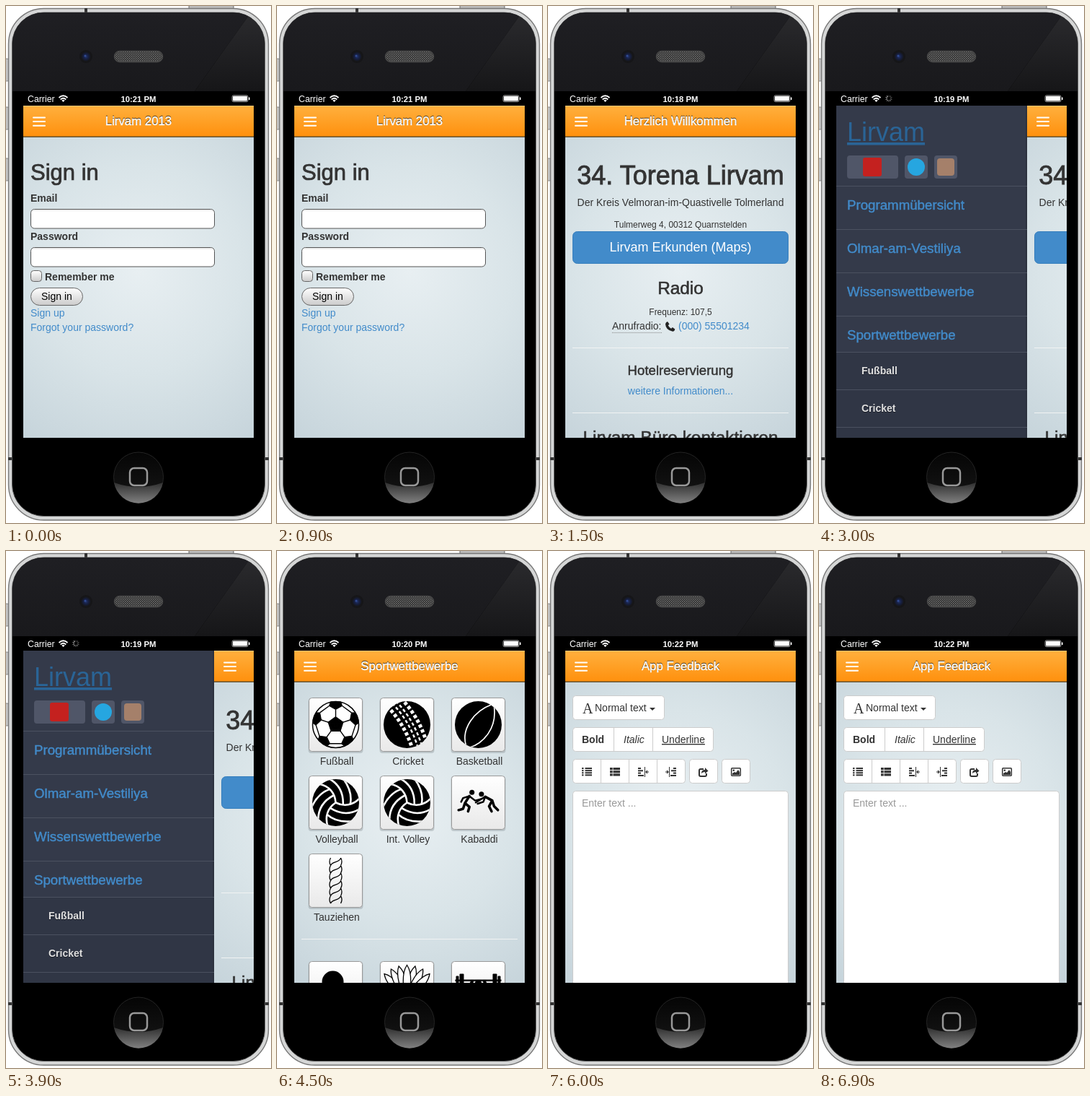
An HTML page for the animation above (7.5 s loop, 368 px wide and 716 px high).

```html
<!DOCTYPE html>
<html lang="de">
<head>
<meta charset="utf-8">
<title>Phone app tour</title>
<style>
html, body { margin: 0; width: 100%; height: 100%; overflow: hidden; background: #fff; }
svg { display: block; width: 368px; height: 716px; font-family: "Liberation Sans", Arial, sans-serif; }
text { white-space: pre; }
</style>
</head>
<body>
<svg id="stage" viewBox="0 0 368 716" xmlns="http://www.w3.org/2000/svg"></svg>
<script>
const SCENE_MS = 1500;
const LINK = '#428bca', INK = '#333';

// Markup helpers
const rect = (x, y, w, h, fill, r = 0, extra = '') =>
  `<rect x="${x}" y="${y}" width="${w}" height="${h}" rx="${r}" fill="${fill}" ${extra}/>`;
const circle = (x, y, r, fill, extra = '') => `<circle cx="${x}" cy="${y}" r="${r}" fill="${fill}" ${extra}/>`;
const path = (d, stroke, width = 1, fill = 'none', extra = '') =>
  `<path d="${d}" stroke="${stroke}" stroke-width="${width}" fill="${fill}" ${extra}/>`;
const group = (body, attrs = '') => `<g ${attrs}>${body}</g>`;
const at = (x, y, body) => group(body, `transform="translate(${x} ${y})"`);
const turn = (deg, body) => group(body, `transform="rotate(${deg})"`);
const text = (x, y, size, str, fill = INK, extra = '') =>
  `<text x="${x}" y="${y}" font-size="${size}" fill="${fill}" ${extra}>${str}</text>`;
const MID = 'text-anchor="middle"', BOLD = 'font-weight="bold"';
const medium = (x, y, size, str, fill = INK, extra = '') =>
  text(x, y, size, str, fill, `stroke="${fill}" stroke-width="${size / 42}" ${extra}`);
const centered = (y, size, str, fill) => text(184, y, size, str, fill, MID);
const heading = (y, size, str) => medium(184, y, size, str, INK, MID);
const repeat = (n, fn) => Array.from({ length: n }, (_, i) => fn(i)).join('');
const spokes = (n, fn) => repeat(n, i => turn(i * 360 / n, fn(i)));
const gradient = (id, top, bottom) =>
  `<linearGradient id="${id}" x2="0" y2="1"><stop stop-color="${top}"/><stop offset="1" stop-color="${bottom}"/></linearGradient>`;

const defs = `<defs>
  ${gradient('orange', '#ffb03e', '#ff900d')}
  ${gradient('button', '#fff', '#cbcbcb')}
  ${gradient('tile', '#fff', '#e9e9e9')}
  ${gradient('glass', '#1f1f23', '#19191c')}
  ${gradient('glare', '#2b2b2e', '#161618')}
  ${gradient('home', '#050505', '#171717')}
  ${gradient('homeShine', '#303030', '#808080')}
  <radialGradient id="paper" gradientUnits="userSpaceOnUse" cx="184" cy="365" r="290">
    <stop stop-color="#e8eff2"/><stop offset=".5" stop-color="#d9e4e8"/><stop offset="1" stop-color="#c5d3da"/>
  </radialGradient>
  <radialGradient id="lens"><stop stop-color="#22356f"/><stop offset=".5" stop-color="#172043"/><stop offset="1" stop-color="#15161c"/></radialGradient>
  <pattern id="mesh" width="3" height="3" patternUnits="userSpaceOnUse">
    ${rect(0, 0, 3, 3, '#242424')}${rect(0, 0, 1.5, 1.5, '#777')}${rect(1.5, 1.5, 1.5, 1.5, '#666')}
  </pattern>
  <clipPath id="screen">${rect(24, 118, 320, 480, '#000')}</clipPath>
  <clipPath id="ball">${circle(0, 0, 32.5, '#000')}</clipPath>
  <clipPath id="body">${rect(9, 9, 350, 698, '#000', 43)}</clipPath>
</defs>`;

function phone() {
  const sideButtons = [[73, 31], [140, 31], [211, 31]]
    .map(([y, h]) => rect(-3, y, 7, h, '#c4c4c4', 2, 'stroke="#888"')).join('');
  const bands = rect(109, 3, 4, 7, '#333') + rect(3, 625, 7, 4, '#333') + rect(358, 625, 7, 4, '#333');
  return sideButtons + rect(254, -2, 62, 7, '#bbb', 2, 'stroke="#666"')
    + rect(3.5, 3.5, 361, 708.5, '#d5d6d6', 49, 'stroke="#777" stroke-width="1.4"')
    + bands + rect(8.5, 9, 351, 697.5, '#000', 44, 'stroke="#555"')
    + group(path('M9 9H340L262 118H9Z', 'none', 0, 'url(#glass)')
      + path('M340 9H360V118H262Z', 'none', 0, 'url(#glare)'), 'clip-path="url(#body)"')
    + circle(111, 70, 9, '#161618') + circle(111, 70, 6.5, 'url(#lens)') + circle(110, 69, 1.5, '#324c94')
    + rect(150.5, 62.5, 67, 15, 'url(#mesh)', 7.5, 'stroke="#484848" stroke-width="1.5"')
    + circle(184, 652.5, 34.5, 'url(#home)', 'stroke="#242424"')
    + path('M150 660Q184 672 218 660A34.5 34.5 0 0 1 150 660Z', 'none', 0, 'url(#homeShine)')
    + rect(172, 640, 24, 24, 'none', 6, 'stroke="#999" stroke-width="2.5"');
}

function statusBar(time, busy) {
  const wifi = path('M73.5 127Q79.5 121.5 85.5 127M75.7 129.5Q79.5 126 83.3 129.5', '#fff', 1.7)
    + path('M79.5 133L77.3 130.7Q79.5 129 81.7 130.7Z', 'none', 0, '#fff');
  const spinner = busy ? at(97, 128, spokes(10, i =>
    path('M0 -2.3V-4.6', '#fff', 1, 'none', `opacity="${.25 + i * .06}"`))) : '';
  const battery = rect(314, 123.8, 22, 8.8, 'none', 2, 'stroke="#fff" stroke-width=".6"')
    + rect(315, 124.8, 20, 6.8, '#fff', 1) + rect(337, 126.5, 1.5, 3.5, '#fff');
  return rect(24, 118, 320, 20, '#000') + text(30, 132.5, 12.3, 'Carrier', '#fff') + wifi + spinner
    + text(184, 132.5, 11.3, time, '#fff', `${BOLD} ${MID}`) + battery;
}

function page(title, body) {
  return rect(24, 138, 320, 460, 'url(#paper)') + body
    + rect(24, 138, 320, 43, 'url(#orange)') + rect(24, 138, 320, 1, '#ffc674') + rect(24, 180.5, 320, 1.3, '#51401f')
    + repeat(3, i => rect(37, 153.5 + i * 5.6, 18, 2, '#fff', 1))
    + medium(184, 164, 16.8, title, '#4a351a', MID) + medium(184, 165, 16.8, title, '#fff', MID);
}
const divider = y => rect(34, y, 300, 1, '#f1f3f3');

function signIn() {
  const field = y => rect(34.5, y + .5, 255, 26.5, '#fff', 5, 'stroke="#555"') + rect(37, y + 1.5, 250, 1, '#ddd');
  return page('Lirvam 2013', medium(34, 241, 31, 'Sign in')
    + text(34, 271, 14, 'Email', INK, BOLD) + field(281)
    + text(34, 324, 14, 'Password', INK, BOLD) + field(334)
    + rect(34.5, 366.5, 15, 15, 'url(#button)', 4, 'stroke="#666"')
    + text(54, 380, 14, 'Remember me', INK, BOLD)
    + rect(34.5, 390.5, 72, 24, 'url(#button)', 12, 'stroke="#666"')
    + text(49, 407, 14, 'Sign in', '#000')
    + text(34, 430, 14, 'Sign up', LINK) + text(34, 450, 14, 'Forgot your password?', LINK));
}

function welcome() {
  const handset = path('M166 437l2.5 3.6-1.7 1.7q1.5 3 4.3 4.4l1.8-1.7 3.4 2.4q-.3 3-3.2 3.3Q163.5 449 163 440.5 163.5 437.5 166 437Z', 'none', 0, '#222');
  return page('Herzlich Willkommen', heading(247, 36, '34. Torena Lirvam')
    + centered(277, 14, 'Der Kreis Velmoran-im-Quastivelle Tolmerland')
    + centered(307, 12, 'Tulmerweg 4, 00312 Quarnstelden')
    + rect(34.5, 312.5, 299, 44, LINK, 6, 'stroke="#357ebd"')
    + centered(340, 18, 'Lirvam Erkunden (Maps)', '#fff')
    + heading(399, 24.4, 'Radio') + centered(428, 12, 'Frequenz: 107,5')
    + text(89, 448, 14, 'Anrufradio:') + path('M89 452.5H159', '#888', 1, 'none', 'stroke-dasharray="1 1"')
    + handset + text(181, 448, 14, '(000) 55501234', LINK)
    + divider(473) + heading(511, 18.6, 'Hotelreservierung')
    + centered(538, 14, 'weitere Informationen...', LINK)
    + divider(563) + heading(606, 24.4, 'Lirvam Büro kontaktieren'));
}

function menu() {
  const items = ['Programmübersicht', 'Olmar-am-Vestiliya', 'Wissenswettbewerbe', 'Sportwettbewerbe'];
  const line = y => rect(24, y, 265, 1, '#4b5160');
  const sub = (y, str) => text(59, y + 1, 14, str, '#171a22', BOLD) + text(59, y, 14, str, '#e0e0e0', BOLD);
  const social = (x, w, mark) => rect(x, 207, w, 32, '#505668', 4) + mark;
  return at(265, 0, welcome()) + rect(24, 138, 265, 460, '#343a4a')
    + rect(24, 480, 265, 118, '#303645') + rect(287, 138, 2, 460, '#2c313e')
    + text(39, 187, 36, 'Lirvam', '#2a6496', 'text-decoration="underline"')
    + social(39, 71, rect(61, 210, 26, 26, '#c4211f', 3))
    + social(119, 32, circle(135, 223, 12, '#26a6e0'))
    + social(160, 32, rect(164, 211, 24, 24, '#a5806a', 4))
    + items.map((str, i) => line(249 + i * 60) + medium(39, 282 + i * 60, 18.7, str, LINK)).join('')
    + line(479) + sub(510, 'Fußball') + line(531) + sub(562, 'Cricket') + line(583);
}

// Sport icons are centred on 0,0
const disc = (fill, body) => circle(0, 0, 32.5, fill) + group(body, 'clip-path="url(#ball)"');

const football = () => disc('#fff', spokes(5, () =>
  path('M0 0L0 -11L10.5 -3.4Z', '#000', 1, '#000')
  + path('M0 -21L9 -26L6 -36H-6L-9 -26Z', '#000', 1, '#000')
  + path('M0 -11V-21M9 -26L21.9 -16.6', '#000', 1.4)))
  + circle(0, 0, 32, 'none', 'stroke="#000" stroke-width="1.5"');

function cricketBall() {
  const seam = (x, w) => path(`M${x} -36Q${x + 9} 0 ${x} 36`, '#fff', w, 'none', 'stroke-dasharray="4.5 3"');
  return disc('#000', turn(-30, seam(-11, 5) + seam(-3, 2.5) + seam(3, 2.5) + seam(11, 5)));
}

const basketball = () => disc('#000',
  path('M19 -28C-6 -19 -24 6 -17 29M22 -25C26 4 8 26 -13 32', '#fff', 1.7));

const volleyball = () => disc('#000', turn(-55, spokes(3, () => path(
  'M0 0C10 -8 14 -20 8 -34M3.5 10C16 2 24 -10 22 -27M9.5 18C21 13 29 2 33 -10', '#fff', 2.6))));

const wrestlers = () => group(circle(-10, -14, 4, '#000') + circle(5, -11, 4, '#000')
  + path('M-14 -8L-21 3L-14 9L-16 16M-21 3L-24 12L-31 14', '#000', 4)
  + path('M-14 -8L-5 -1L3 -3M-14 -8L-24 -5L-27 1', '#000', 2.8)
  + path('M11 -7L22 -1L17 8L21 16M22 -1L25 8L31 14', '#000', 4)
  + path('M11 -7L8 1L-1 4M11 -7L4 -3L-4 2', '#000', 2.8),
  'transform="translate(0 -2) scale(.88)" stroke-linecap="round" stroke-linejoin="round"');

const rope = () => repeat(6, i => at(0, i * 10.5 - 31.5, path(
  'M-7 0Q-10 5 -7 10.5M7 0Q10 5 7 10.5M-7 10.5C-5 4 6 7 7 0', '#000', 1.3)));

const person = () => circle(-4, -9, 15, '#000');

const lotus = () => [-42, -28, -14, 14, 28, 42, 0].map(a => group(
  path('M0 15C-7 1 -7 -22 0 -32C7 -22 7 1 0 15Z', '#000', 1.3, '#fff'), `transform="rotate(${a} 0 15)"`)).join('');

const barbell = () => rect(-32, -12, 64, 2.5, '#000')
  + [-1, 1].map(s => rect(s * 23 - 3, -20, 6, 19, '#000', 1) + rect(s * 29 - 2, -17, 4, 13, '#000', 1)
    + path(`M${s * 8} -10L${s * 14} 0L${s * 6} 8`, '#000', 4)).join('') + circle(0, -6, 5, '#000');

function sports() {
  const tiles = [
    ['Fußball', football], ['Cricket', cricketBall], ['Basketball', basketball],
    ['Volleyball', volleyball], ['Int. Volley', volleyball], ['Kabaddi', wrestlers], ['Tauziehen', rope]
  ];
  const tile = (col, y, icon, label = '') => {
    const x = 44 + col * 99;
    return rect(x - .5, y + 1, 76, 76, '#8b9498', 4, 'opacity=".4"')
      + rect(x + .5, y + .5, 74, 74, 'url(#tile)', 4, 'stroke="#999"')
      + at(x + 37.5, y + 37.5, icon()) + text(x + 39, y + 93, 14, label, INK, MID);
  };
  return page('Sportwettbewerbe',
    tiles.map(([label, icon], i) => tile(i % 3, 203 + Math.floor(i / 3) * 108, icon, label)).join('')
    + divider(537) + [person, lotus, barbell].map((icon, i) => tile(i, 568, icon)).join(''));
}

function feedback() {
  const box = (x, y, w, h = 33) => rect(x + .5, y + .5, w, h, '#fff', 4, 'stroke="#ccc"');
  const split = (x, y) => rect(x, y, 1, 34, '#ccc');
  const list = (x, n, h) => repeat(n, i => {
    const y = 300 + i * 12.5 / n;
    return rect(x, y, h + .5, h, INK) + rect(x + 4.5, y, 9.5, h, INK);
  });
  const indent = x => rect(x, 300, 4, 2, INK) + rect(x, 303.3, 7, 2, INK) + rect(x, 306.6, 4, 2, INK)
    + rect(x, 310, 8, 2, INK) + rect(x + 9, 299, 1, 14, INK) + path(`M${x + 15} 306H${x + 11}m2 -2l-2 2 2 2`, INK, 1.2);
  const share = path('M216 302H212Q210 302 210 304V310Q210 312 212 312H218Q220 312 220 310V308', INK, 2)
    + path('M213 308Q213 303 218 303V300L222.5 304.5L218 308.5V306Q215 306 213 308Z', 'none', 0, INK);
  const picture = rect(254.7, 300.7, 12.6, 10.6, '#fff', 1, 'stroke="#333" stroke-width="1.5"')
    + circle(257.8, 303.8, 1.3, INK) + path('M256 310V308L259 306L261 307L264 303L266 306V310Z', 'none', 0, INK);
  return page('App Feedback', box(34, 200, 127)
    + text(48, 225, 20, 'A', INK, 'font-family="Liberation Serif, serif"')
    + text(65, 222, 14, 'Normal text') + path('M141 217H149L145 221Z', 'none', 0, INK)
    + box(34, 244, 195) + split(91, 244) + split(145, 244)
    + text(47, 266, 14, 'Bold', INK, BOLD) + text(105, 266, 14, 'Italic', INK, 'font-style="italic"')
    + text(158, 266, 14, 'Underline', INK, 'text-decoration="underline"')
    + box(34, 288, 156) + split(73, 288) + split(112, 288) + split(151, 288)
    + list(47, 4, 2) + list(86, 3, 3.2) + indent(125)
    + group(indent(0), 'transform="translate(178 0) scale(-1 1)"')
    + box(196, 288, 39) + share + box(241, 288, 39) + picture
    + box(34, 332, 299, 280) + text(47, 354, 14, 'Enter text ...', '#999'));
}

const scenes = [
  [signIn, '10:21 PM'], [welcome, '10:18 PM'], [menu, '10:19 PM'], [sports, '10:20 PM'], [feedback, '10:22 PM']
];
const stage = document.getElementById('stage');
stage.innerHTML = defs + phone() + group(
  scenes.map(([draw, time]) => group(draw() + statusBar(time, draw === menu), 'class="scene"')).join(''),
  'clip-path="url(#screen)"');
const layers = [...stage.querySelectorAll('.scene')];

function render(ms) {
  const current = Math.floor(ms / SCENE_MS) % layers.length;
  layers.forEach((layer, i) => { layer.style.display = i === current ? '' : 'none'; });
}

let start;
function tick(now) {
  start ??= now;
  render(now - start);
  requestAnimationFrame(tick);
}
render(0);
requestAnimationFrame(tick);
</script>
</body>
</html>
```
